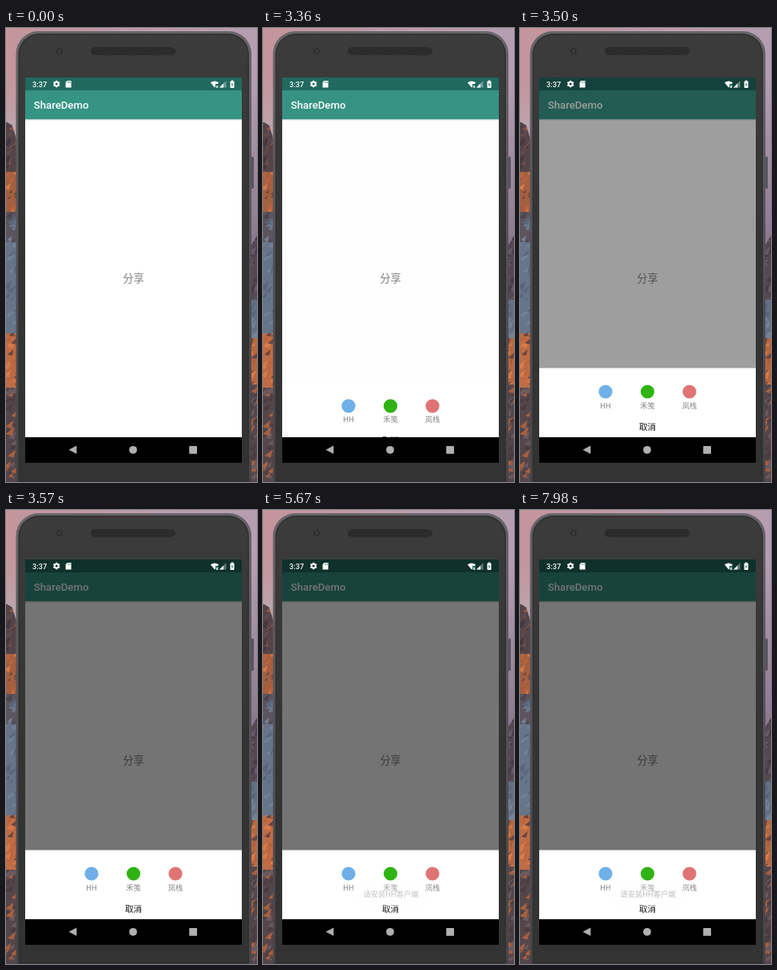
These frames come from a looping animation (314 by 568 pixels, 8000 ms). An HTML page with a canvas:

```html
<!DOCTYPE html>
<html lang="zh">
<head>
<meta charset="utf-8">
<title>ShareDemo</title>
<style>
html, body { margin: 0; width: 100%; height: 100%; overflow: hidden; background: #353535; }
canvas { display: block; width: 314px; height: 568px; }
</style>
</head>
<body>
<canvas id="stage"></canvas>
<script>
const W = 314, H = 568, LOOP = 8000;
const LATIN = 'Roboto, "Noto Sans CJK SC", "Noto Sans CJK", sans-serif';
const HAN = '"Noto Sans CJK SC", "Noto Sans CJK", sans-serif';
const canvas = document.getElementById('stage');
const ratio = window.devicePixelRatio || 1;
canvas.width = W * ratio;
canvas.height = H * ratio;
let g = canvas.getContext('2d');

const clamp = v => Math.max(0, Math.min(1, v));
const span = (t, from, length) => clamp((t - from) / length);
const easeOut = p => 1 - (1 - p) * (1 - p);

function rect(x, y, w, h, color) {
  g.fillStyle = color;
  g.fillRect(x, y, w, h);
}

function round(x, y, w, h, r, color) {
  g.fillStyle = color;
  g.beginPath();
  g.roundRect(x, y, w, h, r);
  g.fill();
}

function disc(x, y, r, color) {
  g.fillStyle = color;
  g.beginPath();
  g.arc(x, y, r, 0, Math.PI * 2);
  g.fill();
}

function poly(color, ...p) {
  g.fillStyle = color;
  g.beginPath();
  for (let i = 0; i < p.length; i += 2) g.lineTo(p[i], p[i + 1]);
  g.fill();
}

function text(s, x, y, size, color, align = 'center', font = HAN, weight = 400) {
  g.font = `${weight} ${size}px ${font}`;
  g.textAlign = align;
  g.fillStyle = color;
  g.fillText(s, x, y);
}

function blend(x0, y0, x1, y1, ...colors) {
  const grad = g.createLinearGradient(x0, y0, x1, y1);
  colors.forEach((c, i) => grad.addColorStop(i / (colors.length - 1), c));
  return grad;
}

const vertical = (y0, y1, ...colors) => blend(0, y0, 0, y1, ...colors);

let seed = 11;
function random() {
  seed = (seed * 16807) % 2147483647;
  return seed / 2147483647;
}

// Rock face: a base tone with scattered slanted facets
function rock(x, w, y, h, base, tones) {
  g.save();
  g.beginPath();
  g.rect(x, y, w, h);
  g.clip();
  rect(x, y, w, h, base);
  for (let i = 0; i < h / 4; i++) {
    const px = x + random() * w, py = y + random() * h, s = 2 + random() * 4;
    poly(tones[i % tones.length], px - s, py + s * 0.6, px + s, py - s, px + s * 0.5, py + s);
  }
  g.restore();
}

function wallpaper() {
  rect(0, 0, W, H, blend(0, 0, W, 0, '#c4959c', '#bd9ba8', '#b59eb0'));
  rect(0, 60, 20, 70, vertical(60, 130, 'rgba(190,160,170,0)', '#bba5ae'));
  rect(300, 60, 14, 210, vertical(60, 270, 'rgba(140,120,146,0)', '#8d7890'));
  const orange = ['#d97a48', '#6b4540', '#b9643f'];
  const brown = ['#5f4a4c', '#45383e', '#8a5a4a'];
  const blue = ['#66758a', '#738296', '#586678'];
  const dark = ['#4a3d42', '#6b5a60', '#a8603f'];
  rock(0, 15, 118, 64, '#54444a', brown);
  poly('#bba5ae', 0, 117, 15, 117, 15, 146, 8, 122);
  rock(0, 15, 180, 52, '#a5603f', orange);
  rock(0, 15, 230, 40, '#5c545e', ['#4c4650', ...blue]);
  rock(0, 15, 268, 116, '#66758a', blue);
  rock(0, 15, 382, 70, '#c06c44', orange);
  rock(0, 15, 450, 118, '#55464b', dark);
  rock(304, 10, 258, 84, '#544852', ['#453c45', '#655a66']);
  poly('#8d7890', 304, 256, 314, 256, 314, 260, 304, 276);
  rock(304, 10, 340, 50, '#637083', blue);
  rock(304, 10, 388, 60, '#b5673f', orange);
  rock(304, 10, 446, 122, '#55464b', dark);
}

function phone() {
  round(306, 161, 4, 40, 1, '#57555b');
  round(12.5, 4, 294.5, 620, 28, vertical(4, 568, '#67656a', '#535156', '#464549'));
  round(15.5, 7, 288.5, 620, 26, '#303030');
  round(17, 8.5, 285.5, 620, 25, vertical(0, 568, '#3c3c3c', '#343434', '#333333'));
  disc(67, 29, 4.2, '#2f2f30');
  disc(67, 29, 2, '#3e3e41');
  round(106, 24, 106, 10, 5, '#2a2a2a');
  for (let y = 26; y < 33; y += 3)
    for (let x = 110 + y % 2; x < 210; x += 3) rect(x, y, 1, 1, '#393939');
}

function backdrop() {
  wallpaper();
  phone();
}

function page() {
  rect(24, 62, 271, 450, '#ffffff');
  rect(24, 62, 271, 16, '#21695f');
  rect(24, 78, 271, 36, '#369484');
  rect(24, 114, 271, 2, vertical(114, 116, '#a9bfbb', '#ffffff'));
  text('ShareDemo', 34.7, 101, 13.2, '#ffffff', 'left', LATIN, 500);
  text('分享', 159.5, 318, 13.3, '#808080');
}

function statusBar() {
  const white = '#ffffff', gap = '#21695f';
  text('3:37', 33, 73.5, 9.2, white, 'left', LATIN, 500);
  g.strokeStyle = white;
  g.lineWidth = 2;
  g.beginPath();
  g.arc(63.2, 70, 2.5, 0, Math.PI * 2);
  g.stroke();
  for (let i = 0; i < 6; i++) {
    const a = i * Math.PI / 3 + Math.PI / 6;
    disc(63.2 + Math.cos(a) * 3.6, 70 + Math.sin(a) * 3.6, 1, white);
  }
  poly(white, 76.5, 66, 81.6, 66, 81.6, 74.5, 74.6, 74.5, 74.6, 68);
  for (let x = 77; x < 81; x += 1.6) rect(x, 67, 0.7, 1.6, gap);

  g.fillStyle = white;
  g.beginPath();
  g.moveTo(261, 74.5);
  g.arc(261, 74.5, 8, -Math.PI * 0.72, -Math.PI * 0.28);
  g.fill();
  rect(262, 70, 4, 5, gap);
  text('x', 264, 74.5, 6, white, 'center', LATIN, 700);
  poly('rgba(255,255,255,.35)', 267, 74.5, 275.5, 66, 275.5, 74.5);
  poly(white, 267, 74.5, 272, 69.5, 272, 74.5);
  round(280.5, 66.5, 5, 8.5, 0.8, white);
  rect(281.8, 65.5, 2.4, 1.2, white);
  poly(gap, 283.5, 68, 281.7, 71.3, 282.8, 71.3, 282.5, 73.8, 284.3, 70.4, 283.2, 70.4);
}

function navBar() {
  rect(24, 512, 271, 32, '#000000');
  poly('#b0b0b0', 78.5, 527.7, 88.3, 522.6, 88.3, 532.8);
  disc(159, 527.8, 4.9, '#b0b0b0');
  round(229.2, 522.9, 9.8, 9.8, 0.8, '#b0b0b0');
}

const apps = [
  ['HH', 107, '#6fb0e8'],
  ['禾笺', 159.5, '#2fb314'],
  ['岚栈', 212, '#e07474']
];

function sheet(t) {
  if (t < 3290) return;
  g.save();
  g.beginPath();
  g.rect(24, 62, 271, 450);
  g.clip();
  g.translate(0, 87 * (1 - easeOut(span(t, 3290, 130))));
  rect(24, 425.5, 271, 87, '#ffffff');
  for (const [name, x, color] of apps) {
    disc(x, 455, 8.6, color);
    text(name, x, 475.5, 9.3, '#858585', 'center', LATIN);
  }
  text('取消', 159.5, 502.5, 10.6, '#111111');
  g.restore();
}

function toast(t) {
  const fade = easeOut(span(t, 5600, 500)) * (1 - span(t, 7560, 500) ** 2);
  if (!fade) return;
  g.save();
  g.globalAlpha = fade;
  round(110, 464.5, 100, 32, 16, '#fcfcfc');
  text('请安装HH客户端', 160, 484, 9.3, '#222222', 'center', LATIN);
  g.restore();
}

// The still surroundings are painted once
const still = document.createElement('canvas');
still.width = canvas.width;
still.height = canvas.height;
const main = g;
g = still.getContext('2d');
g.scale(ratio, ratio);
backdrop();
g = main;

function draw(t) {
  g.setTransform(1, 0, 0, 1, 0, 0);
  g.drawImage(still, 0, 0);
  g.scale(ratio, ratio);
  page();
  const dim = 0.545 * span(t, 3360, 203);
  if (dim) rect(24, 62, 271, 450, `rgba(0,0,0,${dim})`);
  statusBar();
  sheet(t);
  navBar();
  toast(t);
}

const start = performance.now();
function tick() {
  draw((performance.now() - start) % LOOP);
  requestAnimationFrame(tick);
}
tick();
</script>
</body>
</html>
```
